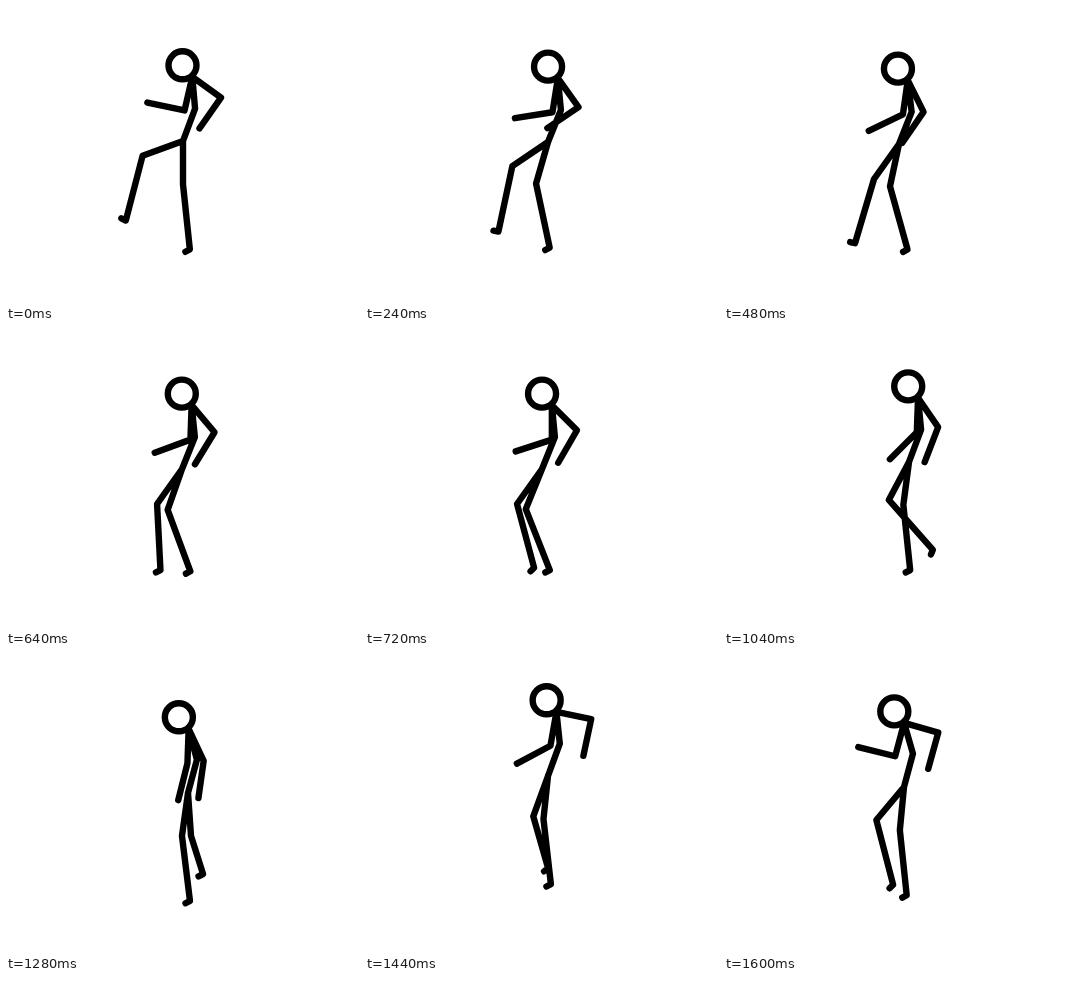
Recreate the animation shown at these times as an HTML page. Size 353 by 297 pixels, loop 1.68 s.

```html
<!DOCTYPE html>
<html lang="en">
<head>
<meta charset="utf-8">
<title>Dancing stick figure</title>
<style>
  html, body { margin: 0; width: 100%; height: 100%; overflow: hidden; background: #fff; }
  svg { display: block; width: 100%; height: 100%; }
  svg * { fill: none; stroke: #000; stroke-width: 6.4; stroke-linecap: round; stroke-linejoin: round; }
</style>
</head>
<body>
<svg viewBox="0 0 353 297">
  <circle id="head" r="14"/>
  <path id="body"/>
</svg>
<script>
const LOOP = 1680, STEP = 80;
const times = [0, 240, 480, 720, 880, 1040, 1280, 1440, 1600];

// One value per key time; angles in degrees, 0 = straight down, positive = right.
const tracks = {
  hipX:     [177, 183, 175, 177, 181, 185, 182, 183, 180],
  hipY:     [135, 136, 138, 138, 114, 131, 137, 120, 131],
  waist:    [-20.5, -22, -21.5, -22, -21, -20.5, -15, -20, -15],
  chest:    [5, 5.5, 7, 5.5, 5.5, 5.5, 15, 6, 16],
  armA:     [-13, -9, -8, 0, -1, -2, -2, -10, -15],
  foreA:    [-102, -81, -64, -72, -62, -45, -14, -62, -104],
  armB:     [54, 35.5, 26.5, 45, 41, 34.5, 25, 78, 74],
  foreB:    [-35, -56, -34.5, -30, -25, -21, -8, -12, -15.5],
  thighA:   [-70, -56, -35.5, -35.5, -33, -28, 4, -20, -40],
  shinA:    [-14.5, -12, -16.5, 15, 30, 41.5, 17.5, 16, 14.5],
  shinLen:  [67, 67, 67, 66, 66, 66.5, 40, 54, 67],
  toeA:     [-117, -101, -104, -45, -34, -22, -63, -54, -45],
  thighB:   [0, -16, -12, -22, -12, -7.5, -8, -6, -5.5],
  shinB:    [6, 12, 15.5, 21.5, 12, 6, 7, 6.5, 6]
};

const count = times.length;
const wrap = i => (i + count) % count;
const span = i => (times[wrap(i + 1)] - times[wrap(i)] + LOOP) % LOOP;
const rate = (v, i) => (v[wrap(i + 1)] - v[wrap(i)]) / span(i);

// Monotone tangent: flat at turning points, harmonic mean elsewhere.
function tangent(v, i) {
  const a = rate(v, i - 1), b = rate(v, i);
  return a * b <= 0 ? 0 : 2 * a * b / (a + b);
}

function sample(v, t) {
  let i = count - 1;
  while (times[i] > t) i--;
  const h = span(i), u = (t - times[i]) / h, w = 1 - u;
  return v[i] * w * w * (1 + 2 * u) + v[wrap(i + 1)] * u * u * (3 - 2 * u)
    + h * u * w * (tangent(v, i) * w - tangent(v, i + 1) * u);
}

function bone([x, y], length, angle) {
  const a = angle * Math.PI / 180;
  return [x + length * Math.sin(a), y + length * Math.cos(a)];
}

const line = points => 'M' + points.map(p => p.map(n => n.toFixed(2)).join(' ')).join('L');
const head = document.getElementById('head');
const body = document.getElementById('body');

function draw(t) {
  const p = {};
  for (const name in tracks) p[name] = sample(tracks[name], t);

  const hip = [p.hipX, p.hipY];
  const mid = bone(hip, -34.5, p.waist);
  const neck = bone(mid, -32, p.chest);
  const elbowA = bone(neck, 34.5, p.armA);
  const elbowB = bone(neck, 35.5, p.armB);
  const kneeA = bone(hip, 43, p.thighA);
  const kneeB = bone(hip, 43.3, p.thighB);
  const footA = bone(kneeA, p.shinLen, p.shinA);
  const footB = bone(kneeB, 65.5, p.shinB);

  head.setAttribute('cx', neck[0] - 9.8);
  head.setAttribute('cy', neck[1] - 11.5);
  body.setAttribute('d', [
    [neck, mid, hip],
    [neck, elbowA, bone(elbowA, 38, p.foreA)],
    [neck, elbowB, bone(elbowB, 37.5, p.foreB)],
    [hip, kneeA, footA, bone(footA, 5, p.toeA)],
    [hip, kneeB, footB, bone(footB, 5, -62)]
  ].map(line).join(''));
}

const start = performance.now();
function tick() {
  const t = (performance.now() - start) % LOOP;
  draw(Math.floor(t / STEP) * STEP);
  requestAnimationFrame(tick);
}
draw(0);
requestAnimationFrame(tick);
</script>
</body>
</html>
```
